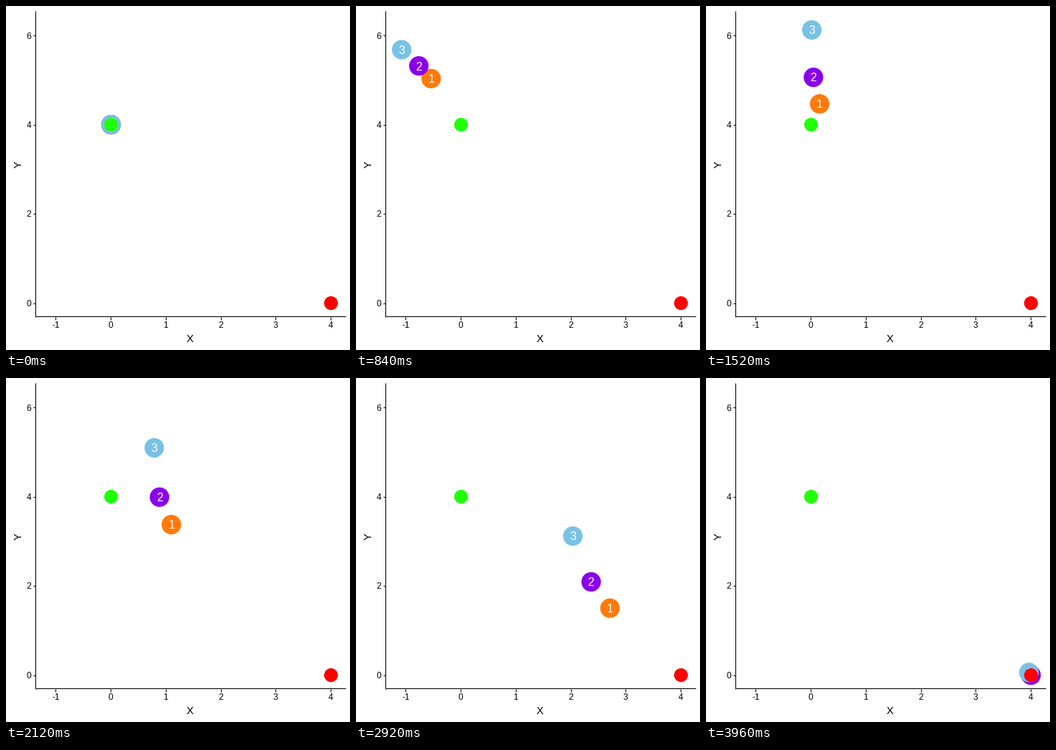
Write a matplotlib script that moves like this. It is 480 px wide and 480 px high and loops after 4000 ms.

```python
import math

import matplotlib.pyplot as plt
from matplotlib.animation import FuncAnimation
from matplotlib.patches import Circle

FRAMES, STEP = 100, 40
PX = 0.72  # points per pixel at 100 dpi

plt.rcParams["font.family"] = "Liberation Sans"
fig = plt.figure(figsize=(4.8, 4.8), dpi=100, facecolor="white")
ax = fig.add_axes([0, 0, 1, 1])
ax.set_xlim(0, 480)
ax.set_ylim(480, 0)
ax.axis("off")


def px(x):
    return 146.6 + 76.72 * x


def py(y):
    return 414.6 - 62.25 * y


def line(xs, ys):
    ax.plot(xs, ys, color="black", lw=1.07 * PX, solid_capstyle="butt")


def label(x, y, s, size, **kw):
    kw = {"ha": "center", "va": "baseline", "color": "black", **kw}
    return ax.text(x, y, s, fontsize=size * PX, **kw)


def disc(x, y, r, color, z):
    return ax.add_patch(Circle((px(x), py(y)), r, facecolor=color, linewidth=0, zorder=z))


# Axes
line([41, 41], [6.5, 433.5])
line([41, 474], [433, 433])
for v in range(-1, 5):
    line([px(v) - 0.5] * 2, [434, 437.5])
    label(px(v) - 0.4, 449, str(v), 12)
for v in range(0, 7, 2):
    line([38, 41], [py(v)] * 2)
    label(35, py(v) + 4.4, str(v), 12, ha="right")
label(257, 469, "X", 14.7)
label(17.5, 221, "Y", 14.7, rotation=90, va="center")

START, GOAL = (0, 4), (4, 0)
GAP = math.dist(START, GOAL)
BRAKE = 10.2               # frames spent slowing down before the turn
TOP, PICKUP = 0.158, 0.034  # top speed and its rate of approach, per frame


class Racer:
    """Brakes while leaving the goal, turns on a circle, then speeds to the goal."""

    def __init__(self, name, color, reach, radius, rate, z):
        self.reach, self.radius, self.rate = reach, radius, math.radians(rate)
        self.speed = radius * self.rate
        self.turn = math.pi + 2 * math.atan2(radius, GAP + reach)
        self.dot = disc(*START, 13.6, color, z)
        self.text = label(0, 0, name, 16, color="white", zorder=7)

    def arc(self, angle):
        return (self.reach + self.radius * math.sin(angle),
                self.radius * (1 - math.cos(angle)))

    def along_side(self, t):
        # Distance away from the goal, and sideways from the first heading
        if t < BRAKE:
            left = 1 - t / BRAKE
            coast = self.speed * BRAKE
            return self.reach - coast * left - (self.reach - coast) * left ** 2, 0
        angle = (t - BRAKE) * self.rate
        if angle < self.turn:
            return self.arc(angle)
        t -= BRAKE + self.turn / self.rate
        run = TOP * t - (TOP - self.speed) * (1 - math.exp(-PICKUP * t)) / PICKUP
        a, s = self.arc(self.turn)
        part = min(run / math.hypot(a + GAP, s), 1)
        return a - part * (a + GAP), s * (1 - part)

    def place(self, t):
        a, s = self.along_side(t)
        x = px(START[0] + (s - a) / math.sqrt(2))
        y = py(START[1] + (s + a) / math.sqrt(2))
        self.dot.center = x, y
        self.text.set_position((x, y + 5.9))


racers = [
    Racer("1", "#ff7a0a", reach=0.893, radius=0.245, rate=10.6, z=3),
    Racer("2", "#8b00eb", reach=1.065, radius=0.41, rate=8.05, z=4),
    Racer("3", "#78c2e5", reach=1.262, radius=0.773, rate=5.85, z=5),
]
disc(*START, 9.6, "#20ff06", 9)
disc(*GOAL, 9.6, "#ff0000", 9)


def draw(n):
    for racer in racers:
        racer.place(n)
    return [r.dot for r in racers] + [r.text for r in racers]


anim = FuncAnimation(fig, draw, frames=FRAMES, interval=STEP,
                     repeat=True, repeat_delay=0, blit=False)
plt.show()
```
